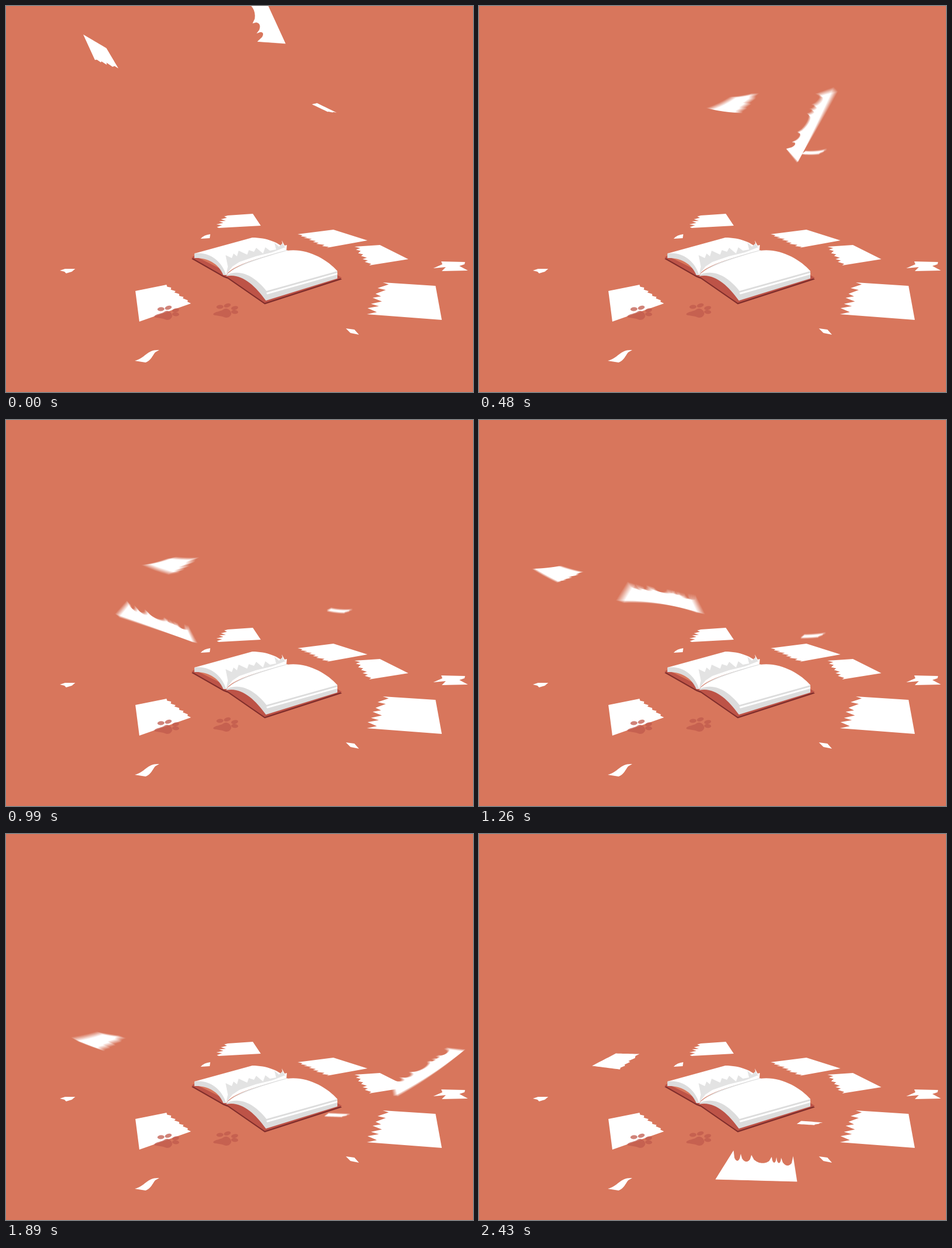
These frames come from a looping animation (823x680 px, 2490 ms). An HTML page with a canvas:

```html
<!DOCTYPE html>
<html lang="en">
<head>
<meta charset="utf-8">
<title>Torn book</title>
<style>
  html, body { margin: 0; width: 100%; height: 100%; overflow: hidden; background: #d8765c; }
  canvas { display: block; }
</style>
</head>
<body>
<canvas id="stage" width="823" height="680"></canvas>
<script>
const W = 823, H = 680, LOOP = 2490, STEP = 30, LAST = 2430;
const SHUTTER = 22, SAMPLES = 10;

const ctx = document.getElementById('stage').getContext('2d');
const layer = document.createElement('canvas');
layer.width = W;
layer.height = H;
const blur = layer.getContext('2d');

let seed = 41;
const random = () => (seed = seed * 16807 % 2147483647) / 2147483647;
const mix = (a, b, k) => a + (b - a) * k;
const between = (p, q, k) => [mix(p[0], q[0], k), mix(p[1], q[1], k)];

function edge(p, q, parts = 10) {
  return Array.from({ length: parts }, (_, i) => between(p, q, i / parts));
}

// Ragged edge with sideways slivers; a positive width cuts to the right.
function ragged(p, q, teeth, width) {
  const points = [p];
  for (let i = 1; i < teeth * 2; i++) {
    const [x, y] = between(p, q, (i + random() * .6 - .3) / (teeth * 2));
    points.push([x + width * (i % 2 ? mix(.5, 1, random()) : mix(-.1, -.4, random())), y]);
  }
  return points;
}

// Rounded bites between sharp peaks; wider bites go deeper.
function bitten(p, q, peaks, depth) {
  const points = [p];
  for (let i = 1; i < peaks.length; i++) {
    const from = peaks[i - 1], span = peaks[i] - from;
    const bite = Math.min(.26, span * 2.5);
    for (let s = 0; s <= 1; s += .125) {
      const u = from + span * s;
      const [x, y] = between(p, q, u);
      const base = u > 0 && u < .999 ? .1 : 0;
      points.push([x, y + depth * (base + bite * Math.sqrt(Math.max(0, Math.sin(Math.PI * s))))]);
    }
  }
  return points;
}

function sheet([a, b, c, d], tear, keys) {
  const points = [...edge(a, b), ...edge(b, c), ...tear(c, d), ...edge(d, a)];
  const half = Math.max(...points.map(p => Math.abs(p[0])));
  return { points, half, keys };
}

// Key poses: time, centre x, centre y, tilt in degrees, bend, openness.
const leaf = sheet([[-43, 0], [3, -11], [43, 0], [3, 18]], (c, d) => ragged(c, d, 4, -6), [
  [0, 167, 80, 44, 0, 1],
  [240, 282, 146, 10, 4, 1],
  [540, 480, 173, -25, 5, 1],
  [720, 502, 202, -37, 5, 1],
  [1080, 220, 262, 2, 4, 1],
  [1260, 139, 265, 4, 3, 1],
  [1650, 54, 294, 13, 6, 1],
  [2100, 241, 398, -14, 0, 1]
]);

const scrap = sheet([[-23, 1], [-15, -4], [23, 0], [8, 4]], (c, d) => ragged(c, d, 2, -3), [
  [0, 561, 180, 20, 0, 1],
  [240, 590, 222, -20, 1, 1],
  [720, 587, 290, 5, 3, 1],
  [1260, 589, 379, -10, 1, 1],
  [2100, 583, 509, -2, 0, 1]
]);

const page = sheet([[-78, 22], [66, 26], [59, -19], [-46, -29]],
  (c, d) => bitten(c, d, [0, .2, .28, .36, .7, .88, 1], 49), [
  [0, 443, 7, -116, 0, .85],
  [240, 504, 175, -114, -7, .62],
  [540, 580, 225, -50, 3, .55],
  [720, 414, 376, -18, 9, .45],
  [1080, 240, 340, 25, -4, .6],
  [1260, 320, 316, 7, -8, .65],
  [1650, 608, 432, -4, 6, .58],
  [1950, 750, 415, -40, 4, .55],
  [2160, 675, 507, -37, 10, .66],
  [2430, 494.5, 586.5, 0, 0, 1]
]);

// Smooth curve through the key poses, at rest at both ends.
function poseAt(keys, time) {
  const n = keys.length - 1;
  const t = Math.min(Math.max(time, 0), keys[n][0]);
  let i = 0;
  while (i < n - 1 && t >= keys[i + 1][0]) i++;
  const a = keys[i], b = keys[i + 1], span = b[0] - a[0], s = (t - a[0]) / span;
  const slope = (k, c) => k % n === 0 ? 0
    : (keys[k + 1][c] - keys[k - 1][c]) / (keys[k + 1][0] - keys[k - 1][0]);
  return a.map((v, c) => mix(v, b[c], s * s * (3 - 2 * s))
    + span * s * (1 - s) * (slope(i, c) * (1 - s) - slope(i + 1, c) * s));
}

function outline({ points, half, keys }, time) {
  const [, x, y, tilt, bend, open] = poseAt(keys, time);
  const cos = Math.cos(tilt * Math.PI / 180), sin = Math.sin(tilt * Math.PI / 180);
  const path = new Path2D();
  for (const [px, py] of points) {
    const u = px + (1 - open) * .9 * py;
    const v = py * open + bend * (1 - (u / half) ** 2);
    path.lineTo(x + u * cos - v * sin, y + u * sin + v * cos);
  }
  return path;
}

function drawSheet(item, time) {
  blur.globalCompositeOperation = 'source-over';
  blur.clearRect(0, 0, W, H);
  blur.globalCompositeOperation = 'lighter';
  blur.fillStyle = '#fff';
  blur.globalAlpha = 1 / SAMPLES;
  for (let i = 0; i < SAMPLES; i++) {
    blur.fill(outline(item, time + SHUTTER * ((i + .5) / SAMPLES - .5)));
  }
  ctx.drawImage(layer, 0, 0);
}

function fill(color, d) {
  ctx.fillStyle = color;
  ctx.fill(new Path2D(d));
}

// Torn from the last corner back to the first.
function tornPiece(corners, teeth, width) {
  const tear = ragged(corners[corners.length - 1], corners[0], teeth, width);
  return 'M' + [...corners, ...tear].join(' ') + 'Z';
}

const litter = [
  tornPiece([[375, 391], [449, 387], [435, 366], [391, 369]], 5, -9),
  tornPiece([[514, 402], [577, 394], [637, 413], [565, 426]], 7, 8),
  tornPiece([[614, 424], [659, 421], [709, 446], [640, 457]], 6, 9),
  tornPiece([[664, 487], [757, 493], [768, 553], [636, 543]], 6, 18),
  tornPiece([[326, 524], [235, 556], [228, 502], [283, 491]], 6, -5),
  'M343 410Q349 403 360 402L359 409Z',
  'M753 462 769 455 767 450 809 451 808 455 799 458 814 466 768 467 775 460Z',
  'M95 466 104 463 122 463 116 468 106 471 103 468Z',
  'M227 625C246 620 248 605 270 606L263 610C258 616 255 625 246 628Z',
  'M599 568 614 570 622 579 607 576Z'
].join('');

function drawPaw(x, y) {
  ctx.save();
  ctx.translate(x, y);
  const paw = new Path2D('M-23 6C-20 1-8 1-4-3C2-6 8-1 9 4C9 10 2 14-4 11C-10 8-22 9-23 6Z');
  for (const [cx, cy, turn] of [[-11, -7, -.1], [2, -9.5, -.3], [15, -5, -.2], [15, 2, .1]]) {
    const toe = new Path2D();
    toe.ellipse(cx, cy, 6.2, 3.4, turn, 0, 7);
    paw.addPath(toe);
  }
  ctx.fillStyle = 'rgba(192,90,76,.75)';
  ctx.fill(paw);
  ctx.restore();
}

function drawBook() {
  const cover = 'M327 443 332 440 388 468 584 474 592 479 456 523 391 478 388 477 383 475Z';
  ctx.save();
  ctx.translate(0, 2.5);
  fill('#7f2d2b', cover);
  ctx.restore();
  fill('#bd5347', cover);

  // left half with the stub of the torn pages
  fill('#dcdcdc', 'M332 436C357 431 382 447 389 474L383 474C374 452 353 443 332 444Z');
  fill('#fff', 'M332 436 434 408C460 408 480 417 489 426L486 413 491 422 495 421 494 432C455 441 400 455 388 474C380 448 357 432 332 436Z');
  fill('#e3e3e3', 'M388 473 391 459 387 439 398 444 401 436 407 441 410 431 425 438 428 430 437 433 441 426 453 436 457 425 465 431 476 429 473 417 481 424 487 418 492 425 469 434 440 441 411 451 399 459Z');

  // right half
  fill('#dcdcdc', 'M388 476C400 456 450 442 495 430L584 467 584 480 458 519C438 491 414 470 388 476Z');
  fill('#fff', 'M388 474C402 458 460 441 495 431C530 426 566 446 584 467L459 502C442 481 417 461 388 474Z');
  fill('#fff', 'M459 505 584 470 584 473 460 508Z');
}

function draw(time) {
  ctx.fillStyle = '#d8765c';
  ctx.fillRect(0, 0, W, H);
  fill('#fff', litter);
  drawPaw(284, 541);
  drawPaw(388, 537);
  drawBook();
  [leaf, scrap, page].forEach(item => drawSheet(item, time));
}

const start = performance.now();

function tick() {
  const elapsed = (performance.now() - start) % LOOP;
  draw(Math.min(Math.floor(elapsed / STEP) * STEP, LAST));
  requestAnimationFrame(tick);
}

tick();
</script>
</body>
</html>
```
